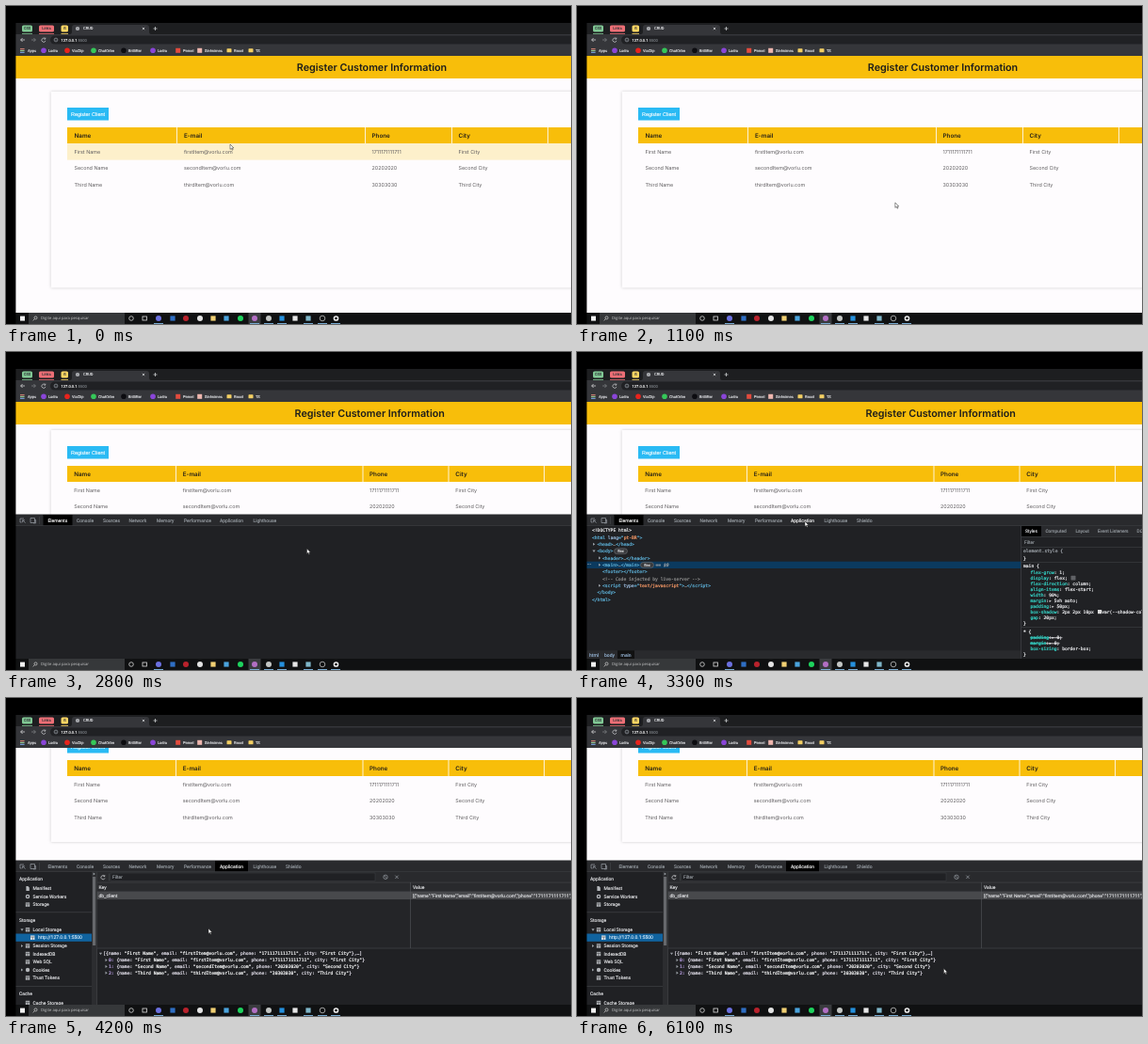
Write an HTML page that moves like this. It is 600 px wide and 338 px high and loops after 6200 ms.

```html
<!DOCTYPE html>
<html lang="en">
<head>
<meta charset="utf-8">
<title>CRUD</title>
<style>
html, body { margin: 0; width: 100%; height: 100%; overflow: hidden; background: #000; }
svg { display: block; width: 100vw; height: 100vh; }
text { white-space: pre; text-rendering: geometricPrecision; font-family: Roboto, sans-serif; stroke-width: .13; }
.page text { font-family: Inter, sans-serif; stroke-width: 0; }
.page .btn { font-family: "Liberation Sans", sans-serif; stroke-width: .13; }
.task text { font-family: "Open Sans", sans-serif; stroke-width: 0; }
text.mono { font-family: "DejaVu Sans Mono", monospace; stroke-width: .22; }
.card { filter: drop-shadow(0 0 1.6px #0003); }
</style>
</head>
<body>
<svg id="stage" viewBox="0 0 600 338"></svg>
<script>
const LOOP = 6200, STEP = 100;
const GOLD = '#f8be0a', BAR = '#292a2d', PANEL = '#202124', PALE = '#e8e9ec', GREY = '#9aa0a6';
const people = [['First', '1711171111711'], ['Second', '20202020'], ['Third', '30303030']]
  .map(([word, phone]) => ({ name: word + ' Name', email: word.toLowerCase() + 'Item@vorlu.com', phone, city: word + ' City' }));

const esc = s => s.replace(/&/g, '&amp;').replace(/</g, '&lt;').replace(/>/g, '&gt;');
const rect = (x, y, w, h, fill, more = '') => `<rect x="${x}" y="${y}" width="${w}" height="${h}" fill="${fill}" ${more}/>`;
const dot = (x, y, r, fill, more = '') => `<circle cx="${x}" cy="${y}" r="${r}" fill="${fill}" ${more}/>`;
const path = (d, stroke, width = .7, fill = 'none') => `<path d="${d}" stroke="${stroke}" stroke-width="${width}" fill="${fill}"/>`;
// y is the middle of the line
const text = (x, y, s, size, fill, more = '') =>
  `<text x="${x}" y="${y + size * .35}" font-size="${size}" fill="${fill}" stroke="${fill}" ${more}>${esc(s)}</text>`;
const mono = (x, y, ...spans) => `<text class="mono" x="${x}" y="${y + 1.6}" font-size="4.67">` +
  spans.map(([fill, s, more = '']) => `<tspan fill="${fill}" stroke="${fill}" ${more}>${esc(s)}</tspan>`).join('') + '</text>';
const group = (id, body, more = '') => `<g id="${id}" ${more}>${body}</g>`;
const arrow = (x, y, open) => open
  ? path(`M${x - 1.6} ${y - 1}h3.2l-1.6 2.4z`, 'none', 0, GREY)
  : path(`M${x - 1} ${y - 1.6}v3.2l2.2 -1.6z`, 'none', 0, GREY);
const reload = (x, y) => path(`M${x + 1.8} ${y - .9}a2.1 2.1 0 1 0 .2 1.8m-.2 -3.3v1.5h-1.5`, '#d0d2d5');
const cross = (x, y, r, c) => path(`M${x - r} ${y - r}l${2 * r} ${2 * r}m0 ${-2 * r}l${-2 * r} ${2 * r}`, c);
const ring = (x, y, r, c) => dot(x, y, r, 'none', `stroke="${c}" stroke-width=".7"`);
const grid = (x, y, c) => rect(x - 2.2, y - 2.2, 4.4, 4.4, c) + path(`M${x - 2.2} ${y - .7}h4.4M${x} ${y - .7}v2.9`, PANEL, .5);

function chrome() {
  const chips = [[17, 11, '#81c995', 'CSS'], [35, 16, '#ee6f76', 'Links'], [58.5, 7.5, '#fdd663', 'G']];
  const marks = [
    [45, 'Ludra', '#8a45d8'], [70, 'ViaClip', '#e8231c'], [98, 'ChatOrbo', '#35c759'], [130, 'Brillifter', '#0c0c10'],
    [161, 'Ludra', '#8a45d8'], [188, 'Pomel', '#e34b3d'], [211, 'Sinônimos', '#eeb6ae'], [242, 'React', '#f3cf63'], [265, 'TS', '#f3cf63']];
  return rect(10, 18, 590, 12, '#1d1e20') + rect(10, 30, 590, 23, '#35363a') +
    path('M68 30q2 0 2-3v-4q0-3 3-3h76q3 0 3 3v4q0 3 2 3z', 'none', 0, '#35363a') +
    chips.map(([x, w, c, s]) => rect(x, 20.5, w, 7, c, 'rx="1.6"') + rect(x, 29, w, .8, c) +
      text(x + w / 2, 24, s, 4, '#33363a', 'text-anchor="middle"')).join('') +
    dot(76, 24, 2.1, '#c9cbce') + path('M74 24h4m-2-2v4', '#55585c', .4) +
    text(82, 24, 'CRUD', 4.1, PALE) + cross(146, 24, 1.2, '#dcdee0') + path('M156.5 24h4m-2-2v4', '#dcdee0') +
    path('M20 36h-4.4m2-2l-2 2l2 2', '#e2e4e6') + path('M27 36h4.4m-2-2l2 2l-2 2', '#85888c') + reload(40, 36) +
    rect(47, 31.5, 570, 9, PANEL, 'rx="4.5"') + ring(53, 36, 1.9, GREY) + path('M53 35.6v1.4m0-2.4v.5', GREY, .5) +
    `<text x="58.5" y="37.5" font-size="4.1" fill="#fff" stroke="#fff">127.0.0.1<tspan fill="${GREY}" stroke="none">:5500</tspan></text>` +
    [0, 1, 2].map(i => rect(15, 45.2 + i * 1.8, 4.6, 1.1, ['#e08a7b', '#8fc48f', '#7aa5e0'][i])).join('') +
    text(23, 47.3, 'Apps', 4, PALE) +
    marks.map(([x, s, c], i) => (i > 6 ? rect(x - 7.5, 45.3, 5, 4, c, 'rx=".6"') : i > 3 && i !== 4
      ? rect(x - 7.8, 44.8, 5, 5, c) : dot(x - 5, 47.3, 2.8, c)) + text(x, 47.3, s, 4, PALE)).join('');
}

function page(id, dx, dy, xs, seps, bottom) {
  const rowY = i => 146 + dy + i * 17.6;
  const cells = (keys, y, size, fill, more) => keys.map((s, i) => text(xs[i], y, s, size, fill, more)).join('');
  return group(id,
    rect(10, 53, 590, 274, '#fefcfe') + rect(10, 53, 590, 24, GOLD) +
    text(388.5 + dx, 65.3, 'Register Customer Information', 10.75, '#1d1d1b', 'font-weight="600" text-anchor="middle"') +
    rect(47.7, 91 + dy, 680, bottom - 91 - dy, '#fefcfe', 'class="card"') +
    rect(65, 108 + dy, 44, 13.5, '#2abaf4') +
    text(87, 114.7 + dy, 'Register Client', 5.5, '#fff', 'class="btn" text-anchor="middle"') +
    people.map((p, i) => rect(65, rowY(i), 535, 17.6, '#fdf0cb', 'class="row" visibility="hidden"') +
      cells(Object.values(p), rowY(i) + 8.9, 5.4, '#5d5b5d')).join('') +
    rect(65, 129 + dy, 535, 17, GOLD) + seps.map(x => rect(x - .5, 129 + dy, 1, 17, '#fdf3d6')).join('') +
    cells(['Name', 'E-mail', 'Phone', 'City'], 137.5 + dy, 6.3, '#252017', 'font-weight="600"'), 'class="page"');
}

function menu() {
  const items = [
    [214.3, 'Back', 'Alt+Left Arrow'], [222.3, 'Forward', 'Alt+Right Arrow'], [230.2, 'Reload', 'Ctrl+R'],
    [241.5, 'Save as...', 'Ctrl+S'], [249.5, 'Print...', 'Ctrl+P'], [257.5, 'Cast...'], [265.2, 'Search images with Vistro Glim'],
    [277.2, 'Create QR Code for this page'], [289, 'Translate to English'], [300.5, 'Shieldo — best ad blocker'],
    [312, 'View page source', 'Ctrl+U'], [320.5, 'Inspect']];
  return group('menu', rect(338, 209, 104, 116.5, BAR, 'stroke="#3c3d40" stroke-width=".5"') +
    rect(338.3, 316.5, 103.4, 8.5, '#48494c', 'id="pick"') +
    [236, 271.2, 283.2, 294.7, 306.3].map(y => rect(338, y, 104, .6, '#44464a')).join('') +
    items.map(([y, s, key = '']) => text(351, y, s, 3.75, s === 'Forward' ? '#77797c' : PALE) +
      text(434, y, key, 3.75, GREY, 'text-anchor="end"')).join('') +
    rect(341.7, 274.8, 4.8, 4.8, '#77797c') + dot(344, 300.5, 2.5, '#e2231a') + arrow(438, 300.5));
}

const tabs = [[44.5, 'Elements', 21], [75, 'Console', 18], [103, 'Sources', 18], [130.5, 'Network', 19], [160, 'Memory', 19],
  [189, 'Performance', 28], [227, 'Application', 25], [262.5, 'Lighthouse', 25], [297, 'Shieldo', 19]];

function tools() {
  return group('tools', rect(10, 173, 590, 153, PANEL) + rect(10, 172.5, 590, 12, BAR) +
    path('M19 177h-4v4h1.6m1-2.2l3 2.8m-3-2.8v2.4m0-2.4h2.4', GREY) + path('M26 176.5h4.5v5h-4.5zM30 178.5h1.6v3.4h-2.6', GREY) +
    rect(35, 175, .5, 8, '#4a4c50') +
    tabs.map(([x, s, w], i) => group('tab' + i, rect(x - 5, 173, w + 10, 11.5, '#000', 'visibility="hidden"') +
      text(x, 179, s, 5, GREY))).join('') + rect(10, 184.5, 590, .5, '#44464a'));
}

function elements() {
  const TAG = '#5db0d7', ATTR = '#9bbbdc', VAL = '#f29766', MUTED = '#8b8b8b', PROP = '#35d4c7';
  const tag = s => [TAG, s], dots = [MUTED, '…'];
  const dom = [
    [16, [PALE, '<!DOCTYPE html>']], [16, tag('<html '), [ATTR, 'lang'], tag('="'), [VAL, 'pt-BR'], tag('">')],
    [21.5, tag('<head>'), dots, tag('</head>')], [21.5, tag('<body>')], [27, tag('<header>'), dots, tag('</header>')],
    [27, tag('<main>'), dots, tag('</main>')], [27, tag('<footer></footer>')], [27, [MUTED, '<!-- Code injected by live-server -->']],
    [27, tag('<script '), [ATTR, 'type'], tag('="'), [VAL, 'text/javascript'], tag('">'), dots, tag('<\/script>')],
    [21.5, tag('</body>')], [16, tag('</html>')]];
  const pill = (x, y) => rect(x, y - 2.8, 14, 5.8, '#3a3b3e', 'rx="2.9" stroke="#8b8d90" stroke-width=".4"') +
    text(x + 7, y, 'flex', 4, PALE, 'text-anchor="middle"');
  const rules = ['flex-grow: 1;', 'display: flex; ', 'flex-direction: column;', 'align-items: flex-start;', 'width: 90%;',
    'margin:▸ 5vh auto;', 'padding:▸ 50px;', 'box-shadow: 2px 2px 10px   var(--shadow-color);', 'gap: 20px;'];
  const reset = ['padding:▸ 0;', 'margin:▸ 0;', 'box-sizing: border-box;'];
  const rule = (y, s, more) => {
    const cut = s.indexOf(':');
    return mono(481.5, y, [PROP, s.slice(0, cut), more], [PALE, s.slice(cut), more]);
  };
  const side = [[476, 'Styles'], [497.5, 'Computed'], [529.5, 'Layout'], [553, 'Event Listeners'], [594.5, 'DOM Breakpoints']];
  return group('elements', rect(10, 222.7, 462, 7.3, '#0b3a5f') + text(11, 225.5, '•••', 4, GREY) +
    dom.map(([x, ...spans], i) => mono(x, 189.6 + i * 7.33, ...spans)).join('') +
    [[18, 2], [18, 3], [24, 4], [24, 5], [24, 8]].map(([x, i]) => arrow(x, 189.6 + i * 7.33, i === 3)).join('') +
    pill(39.5, 211.6) + pill(67.5, 226.3) + mono(83.5, 226.3, [GREY, '== $0', 'font-style="italic"']) +
    rect(10, 317.3, 462, 8.7, BAR) + rect(43, 317.3, 18, 8.7, '#111') +
    [[13, 'html'], [29, 'body'], [46.5, 'main']].map(([x, s]) => text(x, 322, s, 5, ATTR)).join('') +
    rect(471.5, 185, 129, 141, PANEL) + rect(472, 185, 128, 11, BAR) + rect(472, 185, 21, 11, '#000') +
    side.map(([x, s], i) => text(x, 190.5, s, 4.8, i ? GREY : PALE)).join('') +
    rect(472, 196, 128, .5, '#44464a') + text(475, 202, 'Filter', 4.8, GREY) +
    [207, 223.2, 292.3].map(y => rect(472, y, 128, .5, '#44464a')).join('') + rect(471.2, 185, .6, 141, '#4a4c50') +
    mono(474, 211.5, [GREY, 'element.style {']) + mono(474, 219, [PALE, '}']) + mono(474, 227.5, [PALE, 'main {']) +
    rules.map((s, i) => rule(234 + i * 6.05, s)).join('') +
    rect(524.5, 237.8, 5, 4.6, '#606266', 'rx=".6"') + rect(553, 274, 4.2, 4.2, '#d9d9d9') +
    mono(474, 288.5, [PALE, '}']) + mono(474, 297, [PALE, '* {']) +
    reset.map((s, i) => rule(303.2 + i * 6.05, s, i < 2 ? 'text-decoration="line-through"' : '')).join('') + mono(474, 321.5, [PALE, '}']));
}

function storage() {
  const heads = [[192, 'Application'], [236.3, 'Storage'], [314.5, 'Cache']];
  const items = [[202.5, 'Manifest'], [211, 'Service Workers'], [219.6, 'Storage'], [246.3, 'Local Storage', 1], [263.5, 'Session Storage', 2],
    [272, 'IndexedDB'], [280.5, 'Web SQL'], [289, 'Cookies', 2], [297.5, 'Trust Tokens'], [324, 'Cache Storage']];
  const icons = {
    Manifest: y => path(`M21.4 ${y - 2.4}h2l1.4 1.4v3.4h-3.4z`, 'none', 0, '#b4b7bb'),
    'Service Workers': y => dot(23, y, 1.6, 'none', 'stroke="#b4b7bb" stroke-width="1.4"'),
    Cookies: y => dot(23, y, 2.2, '#b4b7bb')
  };
  const icon = (y, s) => icons[s] ? icons[s](y) : grid(23, y, '#b4b7bb');
  const key = s => ['#e2dfea', s], str = s => ['#f4f5f6', `"${s}"`];
  const json = p => Object.entries(p).flatMap(([k, v], i) => [key(`${i ? ', ' : '{'}${k}: `), str(v)]);
  return group('storage',
    heads.map(([y, s]) => text(14, y, s, 5, PALE)).join('') +
    [227.5, 306].map(y => rect(10, y, 81, .6, '#44464a')).join('') +
    items.map(([y, s, a]) => icon(y, s) + (a ? arrow(17, y, a === 1) : '') + text(28.5, y, s, 5, PALE)).join('') +
    rect(10, 250.5, 81, 8.3, '#10639f') + grid(28.2, 254.7, '#e4eef6') +
    text(34, 254.6, 'http://127.0.0.1:5500', 5, '#d6ebfa') +
    rect(91, 185, 5.2, 141, '#2c2d30') + rect(92, 190, 3.2, 73, '#66686c') + arrow(93.6, 187) + rect(96.2, 185, .6, 141, '#4a4c50') +
    rect(96.8, 185, 504, 11, BAR) + reload(103, 190.5) + rect(109, 186.5, .5, 8, '#4a4c50') +
    rect(111, 186, 281, 8.5, PANEL, 'stroke="#3f4145" stroke-width=".5"') + text(113, 190.5, 'Filter', 4.8, GREY) +
    ring(403, 190.3, 2.2, GREY) + path('M401.5 188.8l3 3', GREY) + cross(415, 190.3, 1.7, GREY) +
    rect(96.8, 196, 504, 10, BAR) + rect(96.8, 195.8, 504, .5, '#4a4c50') + rect(96.8, 205.6, 504, .5, '#4a4c50') +
    text(98.5, 201, 'Key', 5, PALE) + text(432, 201, 'Value', 5, PALE) +
    rect(96.8, 206, 504, 8.3, '#48494c') + rect(96.8, 214.3, 504, 51.5, '#242528') +
    text(98.5, 210.2, 'db_client', 5, PALE) + text(432, 210.2, JSON.stringify(people), 4.9, PALE) +
    rect(429.3, 196, .6, 70, '#55575b') + rect(96.8, 265.7, 504, .6, '#4a4c50') +
    arrow(100.5, 271.7, true) + mono(103.3, 271.7, key('['), ...json(people[0]), key('},…]')) +
    people.map((p, i) => arrow(106.5, 278.6 + i * 6.8) +
      mono(109, 278.6 + i * 6.8, ['#b79ce0', i + ': '], ...json(p), key('}'))).join(''));
}

function taskbar() {
  const icons = [[162, '#6b70e0', 1], [177, '#2f6fc4'], [191, '#b8222c', 1], [206, '#e3e3e3', 1], [220, '#f0cf73'], [234, '#4aa3dc'],
    [249, '#1ed35e', 1], [264, '#b26fc4', 1], [279, '#c3c6c4', 1], [293, '#2590dd'], [307, '#e6e6e6'], [321, '#7fb6c9']];
  return `<g class="task">` + rect(10, 326, 590, 12, '#101112') + rect(15, 329.6, 5, 5, '#f2f2f2') + rect(24, 326, 102, 12, '#36383a') +
    ring(31.5, 331.4, 1.5, '#d8d8d8') + path('M30.4 332.6l-1.7 1.8', '#d8d8d8') +
    text(37, 332, 'Digite aqui para pesquisar', 4.2, '#c8c9ca') + rect(257.5, 326, 13, 12, '#3a3c3f') +
    ring(133, 332, 2.3, '#eee') + rect(145, 330, 4.4, 4, 'none', 'stroke="#ddd" stroke-width=".8"') +
    icons.map(([x, c, round]) => round ? dot(x, 332, 3, c) : rect(x - 2.6, 329.4, 5.2, 5.2, c)).join('') +
    ring(336, 332, 2.8, '#d8d8d8') + dot(350.5, 332, 2.1, 'none', 'stroke="#eee" stroke-width="1.5"') +
    [162, 264, 279, 293, 321, 336, 350].map(x => rect(x - 5, 337, 10, 1, '#76a9d0')).join('') + '</g>';
}

const stage = document.getElementById('stage');
stage.innerHTML = '<defs><clipPath id="view"><rect x="10" y="53" width="590" height="273"/></clipPath></defs>' +
  rect(0, 0, 600, 338, '#000') + '<g clip-path="url(#view)">' +
  page('wide', 0, 0, [72.5, 189, 388.5, 480.5], [181.5, 381.5, 473.5, 575.5], 299.5) +
  rect(10, 53, 590, 120, '#fefcfe', 'id="under"') +
  page('short', -2.3, -8, [72.2, 187.7, 386, 477.3], [180.5, 379, 470, 571.5], 208) + '</g>' +
  chrome() + tools() + elements() + storage() + taskbar() + menu() + rect(0, 0, 10.4, 338, '#000') +
  group('cursor', path('M0 0v5.4l1.3-1.2l.9 2l.9-.4l-.9-1.9h1.7z', '#222', .5, '#fff'));

const $ = id => document.getElementById(id);
const show = (id, on) => { $(id).style.display = on ? '' : 'none'; };
const ease = k => k * k * (3 - 2 * k);

const track = [[0, 238, 147], [800, 338, 209], [1700, 337.5, 209], [1900, 350, 235], [2300, 377, 319.5], [2500, 377, 319.5],
  [2800, 319.5, 209], [3200, 242, 180], [3600, 242, 180], [3800, 235, 125], [4000, 235, 125], [4200, 215, 245],
  [4500, 165, 272], [4900, 148, 287], [5400, 432, 289], [5600, 405, 287], [5800, 441, 284], [6000, 358, 288], [6100, 389.5, 287.5], [LOOP, 389.5, 287.5]];

function pointer(t) {
  const i = track.findIndex(p => p[0] > t);
  const [t0, x0, y0] = track[i - 1], [t1, x1, y1] = track[i];
  const k = ease((t - t0) / (t1 - t0));
  return [x0 + (x1 - x0) * k, y0 + (y1 - y0) * k];
}

function draw() {
  const t = Math.floor(performance.now() % LOOP / STEP) * STEP;
  const [x, y] = pointer(t);
  const docked = t >= 2600, loaded = t >= 3000, app = t >= 3600;
  const scroll = 55 * ease(Math.min(1, Math.max(0, (t - 3700) / 300)));
  show('wide', !docked);
  show('under', docked);
  show('short', docked);
  show('tools', docked);
  show('elements', loaded && !app);
  show('storage', app);
  show('tab8', loaded);
  show('menu', t >= 1700 && !docked);
  show('pick', y > 316);
  $('short').setAttribute('transform', `translate(0 ${-scroll})`);
  $('cursor').setAttribute('transform', `translate(${x} ${y})`);
  tabs.forEach((_, i) => {
    const on = i === (app ? 6 : 0), [back, label] = $('tab' + i).children;
    const tint = on || (i === 6 && loaded) ? '#fff' : GREY;
    back.setAttribute('visibility', on ? 'visible' : 'hidden');
    label.setAttribute('fill', tint);
    label.setAttribute('stroke', tint);
  });
  const free = docked ? y < 173 : t < 1700;
  $(docked ? 'short' : 'wide').querySelectorAll('.row').forEach(row => {
    const top = +row.getAttribute('y') - (docked ? scroll : 0);
    row.setAttribute('visibility', free && y >= top && y < top + 17.6 ? 'visible' : 'hidden');
  });
  requestAnimationFrame(draw);
}
draw();
</script>
</body>
</html>
```
